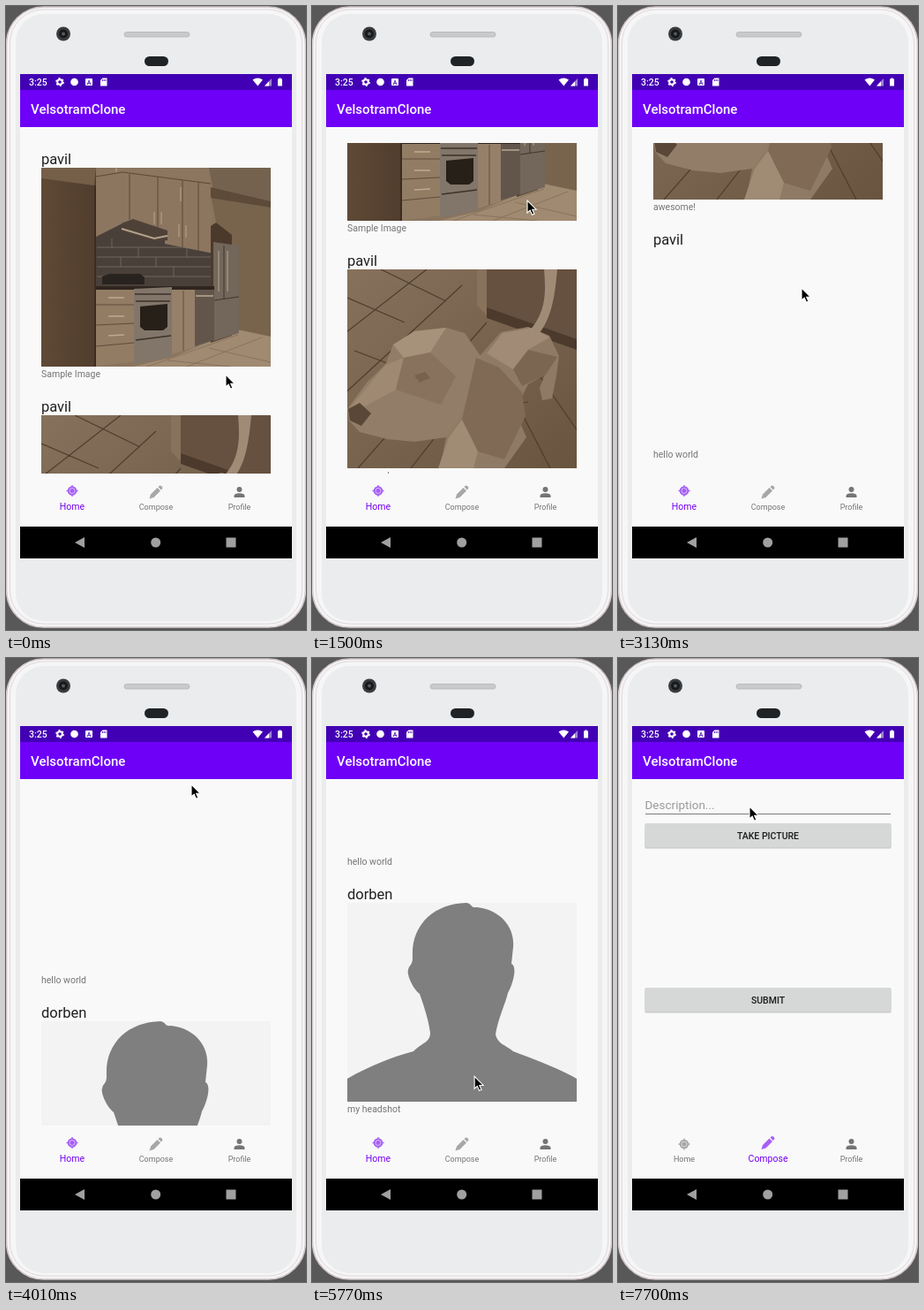
These frames come from a looping animation (340x706 px, 8000 ms). An HTML page:

```html
<!DOCTYPE html>
<html lang="en">
<head>
<meta charset="utf-8">
<title>Phone feed</title>
<style>
  html, body { margin: 0; width: 100%; height: 100%; overflow: hidden; background: #585858; }
  svg { display: block; font-family: Roboto, "Open Sans", sans-serif; }
  .medium { font-weight: 500; }
  .name { font-size: 16.5px; fill: #1f1f1f; }
  .note { font-size: 10.5px; fill: #757575; }
  .button { font-size: 10.5px; font-weight: 500; fill: #1c1c1c; text-anchor: middle; }
  .tab { color: #757575; text-anchor: middle; font-size: 9px; }
  .tab text { fill: currentColor; }
  .tab.big { font-size: 10.5px; }
  .tab.big .icon { transform: translateY(-1.5px); }
  .tab.on { color: #7200f5; }
  .tab .soft { opacity: .62; }
</style>
</head>
<body>
<svg width="340" height="706" viewBox="0 0 340 706">
  <defs>
    <clipPath id="feedClip"><rect x="40" y="155" width="260" height="374"/></clipPath>
    <clipPath id="photoClip"><rect width="260" height="225"/></clipPath>
    <clipPath id="pageClip"><rect x="16" y="137" width="308" height="452"/></clipPath>
    <linearGradient id="wood" x2="1" y2="1">
      <stop stop-color="#86715c"/><stop offset="1" stop-color="#69543f"/>
    </linearGradient>
    <linearGradient id="panel" x2="1">
      <stop stop-color="#5f4936"/><stop offset="1" stop-color="#513d2d"/>
    </linearGradient>

    <g id="kitchen" clip-path="url(#photoClip)">
      <rect width="260" height="225" fill="#8a745e"/>
      <path d="M190 0H260V42L196 30Z" fill="#75624e"/>
      <path d="M192 30 260 40V195L222 188Z" fill="#78634d"/>
      <path d="M192 22 260 38V45L192 34Z" fill="#5d4a39"/>
      <path d="M104 225 150 214 222 183 260 191V225Z" fill="#a08a71"/>
      <path d="M120 225 223 189M165 225 250 192M143 218 215 225M190 204 260 220" stroke="#846e58" stroke-width=".8"/>
      <path d="M62 78 92 60 195 96V134H62Z" fill="#4a403a"/>
      <path d="M63 90H195M63 101H195M63 112H195M63 123H195" stroke="#82766b" stroke-width=".7"/>
      <path d="M80 80V90M110 90V101M90 101V112M130 101V112M150 112V123M165 90V101" stroke="#82766b" stroke-width=".7"/>
      <path d="M62 0H190L195 97 140 86V74L100 59 62 78Z" fill="#8c7660"/>
      <path d="M62 10 92 5 192 18M100 7V59M132 10V74M160 14V90M178 16V94" fill="none" stroke="#5c4836" stroke-width="1"/>
      <path d="M128 50V64M136 50V64M156 64V78M164 65V79M85 5V0M158 22V38" stroke="#b59d82" stroke-width="1.2"/>
      <path d="M91 63 104 58 143 71V82L128 84 91 72Z" fill="#4e4138"/>
      <path d="M91 69 128 80 143 77" fill="none" stroke="#b5a28d" stroke-width="2"/>
      <path d="M192 66 198 62 216 76V190L192 198Z" fill="#4b3a2c"/>
      <path d="M195 84 224 88V187L195 196Z" fill="#73665a"/>
      <path d="M196 150 224 146M207 88V149" stroke="#41362e" stroke-width="1"/>
      <path d="M201 94V140M211 94V140" stroke="#a99886" stroke-width="1.3"/>
      <path d="M62 134H196V140H62Z" fill="#30261f"/>
      <path d="M69 123 77 120H112L117 124V132H69Z" fill="#292320"/>
      <path d="M62 138H105V219L62 225Z" fill="#927c64"/>
      <path d="M62 155H105M62 178 105 176M62 202 105 198" stroke="#604c3a" stroke-width="1"/>
      <path d="M76 147H94M76 168H94M76 190 94 189" stroke="#c0a98e" stroke-width="1.4"/>
      <path d="M105 137 148 135V213L105 222Z" fill="#82766a"/>
      <path d="M106 143H147M107 151H146M107 195 147 190" stroke="#3c3129" stroke-width="1.4"/>
      <path d="M112 157 143 154V180L138 184H117L112 180Z" fill="#272019"/>
      <path d="M148 138H174V203L148 211Z" fill="#96806a"/>
      <path d="M161 139V207" stroke="#634e3c"/>
      <path d="M174 138H196V195L174 202Z" fill="#62564c"/>
      <path d="M175 145H195" stroke="#a39481" stroke-width="2"/>
      <path d="M0 0H62V225H0Z" fill="url(#panel)"/>
      <path d="M0 0H62L60 20 0 12Z" fill="#765f49"/>
      <path d="M61 20V225" stroke="#3c2c20" stroke-width="2"/>
    </g>

    <g id="dog" clip-path="url(#photoClip)">
      <rect width="260" height="225" fill="url(#wood)"/>
      <path d="M-10 78 90 0M-8 145 130 18M12 225 158 60M72 225 190 75M175 225 130 110M230 225 160 90M290 225 190 80M0 32 65 60M38 0 112 36M8 92 45 106M170 155 205 150" stroke="#4f3c2d" stroke-width="1.2"/>
      <path d="M153 0H260V82L153 45Z" fill="#665140"/>
      <path d="M147 0H158V52L147 41Z" fill="#88725c"/>
      <path d="M158 43 260 79V91L158 55Z" fill="#4c3a2d"/>
      <path d="M206 70C226 48 225 25 223 0H238C235 34 231 54 218 72Z" fill="#a08b76"/>
      <path d="M150 98 174 71 205 65 229 75 240 98 237 120 232 146 221 148 218 134 224 119 205 130 190 160 203 190 178 225H105L112 190Z" fill="#8f7a66"/>
      <path d="M158 95 176 72 210 66 229 77 205 91 188 113Z" fill="#a18b76"/>
      <path d="M188 113 205 91 238 99 225 119 198 132Z" fill="#7b6652"/>
      <path d="M0 158 22 128 43 108 52 85 76 70 112 66 133 72 151 98 143 130 128 168 112 190 76 195 45 192 14 184 2 171Z" fill="#927d68"/>
      <path d="M52 85 76 70 112 66 94 94 64 100Z" fill="#a6917b"/>
      <path d="M2 158 43 108 64 100 55 136 22 154Z" fill="#9f8973"/>
      <path d="M64 100 94 94 123 121 106 153 55 136Z" fill="#88725e"/>
      <path d="M1 158 14 151 27 163 16 177 3 171Z" fill="#5b4737"/>
      <path d="M146 100 172 111 198 139 202 166 178 215 148 206 130 170Z" fill="#806a55"/>
      <path d="M130 170 148 206 143 225H103L115 190Z" fill="#a08b75"/>
      <path d="M76 120 88 116 94 123 82 128Z" fill="#78624e"/>
    </g>

    <g id="portrait">
      <rect width="260" height="225" fill="#f3f3f3"/>
      <path fill="#7f7f7f" d="M0 225V199C26 184 52 174 75 168C85 158 94 158 94 147C92 130 84 109 82 103C74 97 67 80 69 76C70 70 74 71 74 62C72 25 98 1 135 0C142 1 139 6 147 5C174 8 190 28 188 50L186 69C193 72 188 91 182 102C180 112 171 130 168 149C171 160 178 160 188 168C208 176 238 186 260 199V225Z"/>
    </g>
  </defs>

  <!-- phone body -->
  <rect width="340" height="706" fill="#585858"/>
  <rect x=".5" y="1" width="339" height="702" rx="42" fill="#f5f3f4" stroke="#cfc4c8" stroke-width="1.5"/>
  <rect x="4.5" y="4" width="331" height="695" rx="38" fill="#f6f6f7" stroke="#dfd9dc"/>
  <rect x="11" y="9" width="318" height="687" rx="32" fill="#ebeced"/>
  <circle cx="65" cy="31.5" r="8" fill="#3a3d40"/>
  <circle cx="65" cy="31.5" r="5" fill="#17191b"/>
  <circle cx="65" cy="31.5" r="2" fill="#55595d"/>
  <rect x="134" y="29.5" width="74" height="5.5" rx="2.7" fill="#c9cacc" stroke="#b3b4b7" stroke-width=".8"/>
  <rect x="157" y="57" width="27" height="11" rx="5.5" fill="#1f2326"/>

  <!-- screen -->
  <rect x="16" y="77" width="308" height="548" fill="#f9f9f9"/>
  <rect x="16" y="77" width="308" height="18" fill="#4200b4"/>
  <rect x="16" y="95" width="308" height="42" fill="#6e00f8"/>
  <text class="medium" x="26" y="90" font-size="10.5" fill="#fff">3:25</text>
  <g fill="#fff">
    <circle cx="61" cy="86" r="2.8" fill="none" stroke="#fff" stroke-width="2"/>
    <circle cx="61" cy="86" r="4.1" fill="none" stroke="#fff" stroke-width="1.6" stroke-dasharray="2.1 2.2"/>
    <circle cx="77.5" cy="86" r="4.3"/>
    <rect x="90" y="82" width="8" height="8" rx="1"/>
    <text class="medium" x="94" y="88.6" font-size="7" text-anchor="middle" fill="#4200b4">A</text>
    <path d="M109.500 81.500H114.500V90.500H107V84Z"/>
    <path d="M109.500 83V85M111.200 83V85M112.900 83V85" stroke="#4200b4" stroke-width=".8"/>
    <path d="M279.500 83.500Q285.300 79.500 291 83.500L285.300 90.500Z"/>
    <path d="M293 90.500 301 82V90.500Z" opacity=".5"/>
    <path d="M293 90.500 298 85.200V90.500Z"/>
    <path d="M308 82.500H309.400V81.500H311.600V82.500H313V90.500H308Z"/>
  </g>
  <text class="medium" x="28" y="122" font-size="15" fill="#fff">VelsotramClone</text>

  <g id="home" clip-path="url(#feedClip)"><g id="feed"></g></g>

  <g id="compose">
    <text x="30.500" y="171" font-size="13.500" fill="#9a9a9a">Description...</text>
    <path d="M31 176.500H309" stroke="#7c7c7c"/>
    <rect x="30.500" y="188" width="279" height="27.500" rx="1.500" fill="#c3c4c4"/>
    <rect x="30.500" y="187" width="279" height="27.500" rx="1.500" fill="#d6d7d7"/>
    <text class="button" x="170" y="204.500">TAKE PICTURE</text>
    <rect x="30.500" y="374" width="279" height="27.500" rx="1.500" fill="#c3c4c4"/>
    <rect x="30.500" y="373" width="279" height="27.500" rx="1.500" fill="#d6d7d7"/>
    <text class="button" x="170" y="390.500">SUBMIT</text>
  </g>

  <g clip-path="url(#pageClip)"><circle id="ripple" cx="171" cy="557" r="47" fill="#dadada"/></g>

  <g id="homeTab" class="tab">
    <g class="icon soft" fill="none" stroke="currentColor">
      <circle cx="75" cy="550" r="4.500" fill="currentColor" stroke-width="1.500"/>
      <path d="M75 543.500V556.500M68.500 550H81.500" stroke-width="1.300"/>
      <circle cx="75" cy="550" r="3" stroke="#f9f9f9" stroke-width=".6"/>
    </g>
    <text x="75" y="570">Home</text>
  </g>
  <g id="composeTab" class="tab">
    <path class="icon soft" fill="currentColor" d="M162.500 557.500 164 552.500 171.500 545 175 548.500 167.500 556ZM172.500 544 174 542.700Q175.200 542 176.300 543.200L177 544Q178 545 177 546.200L175.800 547.500Z"/>
    <text x="170" y="570">Compose</text>
  </g>
  <g class="tab">
    <g fill="currentColor">
      <circle cx="264.500" cy="547" r="3"/>
      <path d="M258.500 556V554Q259 551.300 264.500 551.300T270.500 554V556Z"/>
    </g>
    <text x="264.500" y="570">Profile</text>
  </g>

  <rect x="16" y="589" width="308" height="36"/>
  <g fill="#a0a0a0">
    <path d="M78 607 89 601V613Z"/>
    <circle cx="169.700" cy="607" r="5.500"/>
    <rect x="249.500" y="601.500" width="11" height="11"/>
  </g>

  <path id="cursor" d="M0 0V14L3.200 11.100 5.500 16.300 7.900 15.300 5.700 10.200H10Z" fill="#000" stroke="#fff" stroke-width="1.100"/>
</svg>

<script>
const $ = id => document.getElementById(id);
const LOOP = 8000, START = 888, STEP = 147.8;

const posts = [
  ["pavil", "kitchen", "Sample Image"],
  ["pavil", "dog", "awesome!"],
  ["pavil", "", "hello world"],
  ["dorben", "portrait", "my headshot"]
];
$("feed").innerHTML = posts.map(([name, photo, note], i) => `
  <g transform="translate(40 ${183 + 280 * i})">
    <text class="name" y="-4">${name}</text>
    ${photo && `<use href="#${photo}"/>`}
    <text class="note" y="236.500">${note}</text>
  </g>`).join("");

// Keys: [step, value...], linear in between
const scrollKeys = [
  [-1, 0], [0, 7], [1, 42], [2, 88], [3, 135], [4, 165], [6, 184], [8, 184],
  [10, 219], [12, 350], [13, 425], [14, 460], [15, 469], [17, 469],
  [18, 485], [20, 570], [21, 612], [22, 622], [25, 622], [27, 735], [29, 746]
];
const cursorKeys = [
  [-1, 249, 417], [0, 249, 370], [2, 250, 290], [3, 248, 242], [4, 244, 220], [7, 224, 420],
  [8, 222, 420], [10, 221, 381], [12, 214, 240], [13, 210, 200], [15, 208, 319],
  [17, 208, 319], [21, 210, 143], [23, 211, 175], [25, 214, 407],
  [27, 222, 294], [29, 222, 207], [30, 222, 207], [34, 171.500, 562], [35, 171.500, 562],
  [36, 172.500, 562], [40, 172.500, 562], [44, 152, 200], [46, 149, 168]
];

function at(keys, step) {
  const next = keys.findIndex(k => k[0] >= step);
  if (next < 0) return keys[keys.length - 1].slice(1);
  if (next === 0) return keys[0].slice(1);
  const a = keys[next - 1], b = keys[next];
  const p = (step - a[0]) / (b[0] - a[0]);
  return a.slice(1).map((v, i) => v + (b[i + 1] - v) * p);
}

function draw(time) {
  const step = Math.max(-1, Math.floor((time % LOOP - START) / STEP));
  const onCompose = step >= 39, settled = step >= 40;
  $("feed").setAttribute("transform", `translate(0 ${-Math.round(at(scrollKeys, step)[0])})`);
  $("cursor").setAttribute("transform", `translate(${at(cursorKeys, step).join(" ")})`);
  $("home").style.display = onCompose ? "none" : "";
  $("compose").style.display = onCompose ? "" : "none";
  $("ripple").style.opacity = step === 39 ? 1 : step === 40 ? .4 : 0;
  $("homeTab").classList.toggle("on", !onCompose);
  $("homeTab").classList.toggle("big", !settled);
  $("composeTab").classList.toggle("on", onCompose);
  $("composeTab").classList.toggle("big", settled);
}

const begin = performance.now();
function tick() {
  draw(performance.now() - begin);
  requestAnimationFrame(tick);
}
tick();
</script>
</body>
</html>
```
